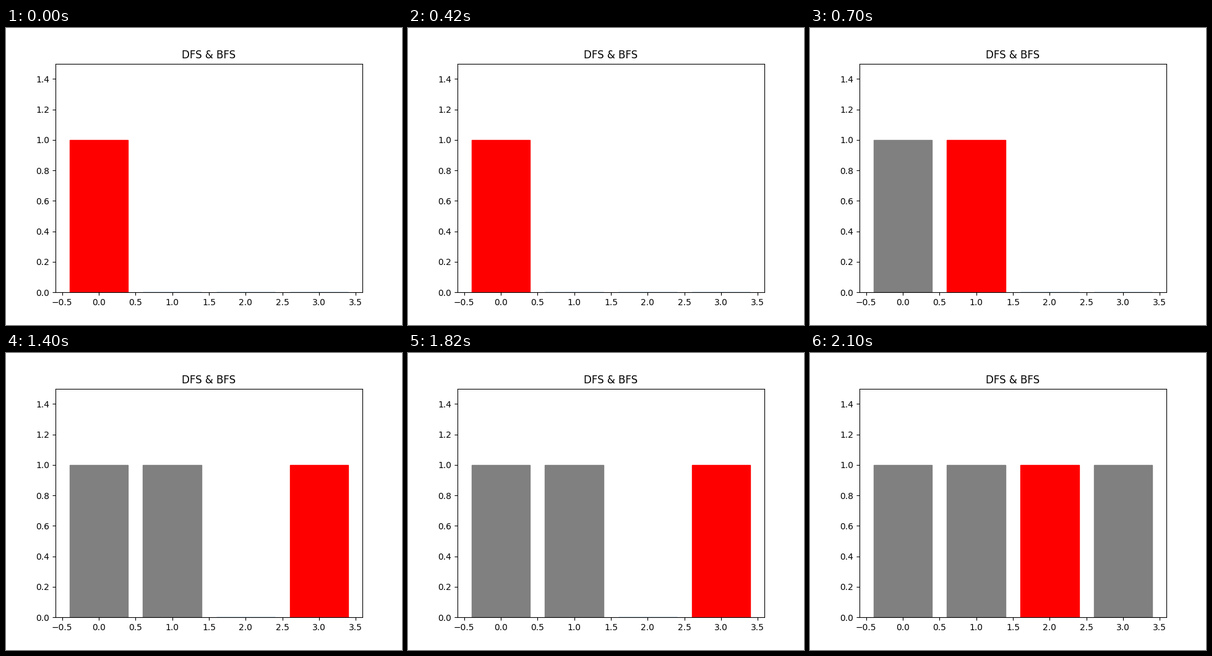
Recreate the animation shown at these times as a matplotlib script. Size 640 px wide and 480 px high, loop 2800 ms.

```python
import matplotlib.pyplot as plt
from matplotlib.animation import FuncAnimation

ORDER = [0, 1, 3, 2]  # order in which the nodes are visited
STEP_MS = 700

plt.rcParams["font.family"] = "DejaVu Sans"
fig, ax = plt.subplots(figsize=(6.4, 4.8), dpi=100)
ax.set_title("DFS & BFS")
bars = ax.bar(range(len(ORDER)), [0] * len(ORDER))
ax.set_xlim(-0.59, 3.59)
ax.set_ylim(0, 1.5)


def update(step):
    visited = ORDER[:step + 1]
    for node, bar in enumerate(bars):
        bar.set_height(1 if node in visited else 0)
        if node == visited[-1]:
            bar.set_color("red")
        else:
            bar.set_color("gray" if node in visited else "C0")
    return bars.patches


anim = FuncAnimation(fig, update, frames=len(ORDER), interval=STEP_MS,
                     init_func=lambda: update(0), repeat=True, repeat_delay=0)
plt.show()
```
